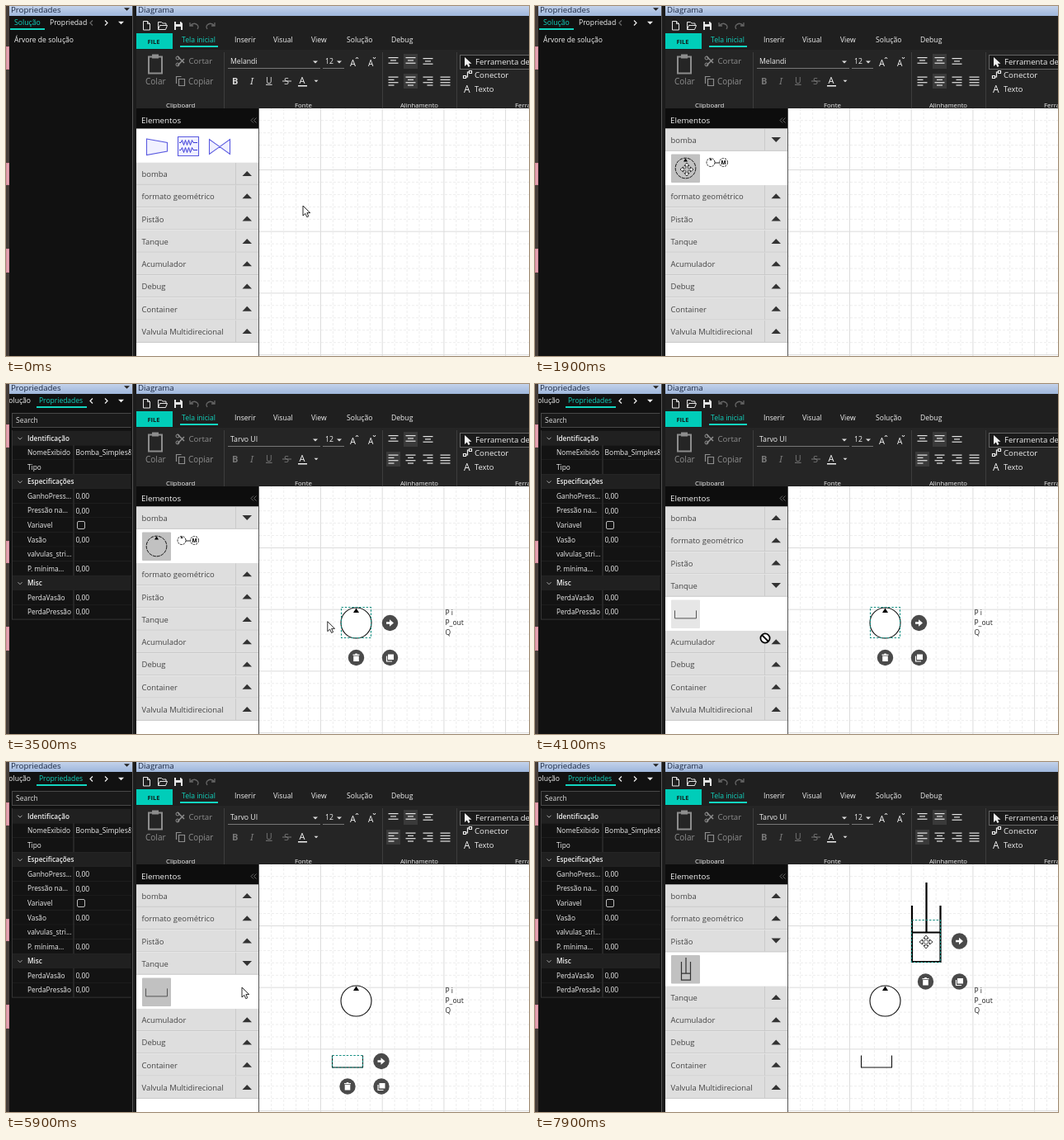
Write an HTML page that moves like this. It is 634 by 424 pixels and loops after 8 s.

```html
<!DOCTYPE html>
<html lang="pt">
<head>
<meta charset="utf-8">
<title>Diagrama</title>
<style>
html, body { margin: 0; width: 100%; height: 100%; overflow: hidden; background: #111; }
svg { display: block; width: 634px; height: 424px; font-family: "Open Sans", "Noto Sans", sans-serif; }
text { white-space: pre; }
</style>
</head>
<body>
<svg id="stage" viewBox="0 0 634 424" xmlns="http://www.w3.org/2000/svg">
<defs>
<linearGradient id="title" x2="0" y2="1"><stop offset="0" stop-color="#c3d2ea"/><stop offset="1" stop-color="#9fb7dc"/></linearGradient>
<clipPath id="side"><rect x="4" y="12" width="147.500" height="412"/></clipPath>
<clipPath id="tabA"><rect x="4" y="12" width="94.500" height="20"/></clipPath>
<clipPath id="ribbon"><rect x="158" y="12" width="476" height="112"/></clipPath>
</defs>
<g id="base"></g><g id="live"></g>
</svg>
<script>
const LOOP = 8000, TEAL = '#12d5c0', ROW = 27.3, OPEN = 41;
const $ = id => document.getElementById(id);

const rect = (x, y, w, h, fill, extra = '') =>
  `<rect x="${x}" y="${y}" width="${w}" height="${h}" fill="${fill}" ${extra}/>`;
const path = (d, stroke, w = 1, fill = 'none', extra = '') =>
  `<path d="${d}" stroke="${stroke}" stroke-width="${w}" fill="${fill}" ${extra}/>`;
const circle = (x, y, r, fill, extra = '') =>
  `<circle cx="${x}" cy="${y}" r="${r}" fill="${fill}" ${extra}/>`;
// y is the middle of the line
const text = (x, y, s, size, fill, extra = '') =>
  `<text x="${x}" y="${y + size * 0.36}" font-size="${size}" fill="${fill}" ${extra}>${s}</text>`;
const at = (x, y, s) => `<g transform="translate(${x} ${y})">${s}</g>`;
const down = (x, y, r, fill) => path(`M${x - r} ${y - r / 2}h${2 * r}l${-r} ${r}z`, 'none', 0, fill);

function grid() {
  let minor = '', major = '';
  for (let i = -4; i < 18; i++) {
    const x = 381.500 + i * 14.940, y = 198.500 + i * 14.940;
    const v = x > 307 && x < 634 ? `M${x.toFixed(1)} 124V424` : '';
    const h = y > 124 && y < 424 ? `M307 ${y.toFixed(1)}H634` : '';
    if (i % 5) minor += v + h; else major += v + h;
  }
  return rect(307, 124, 327, 300, '#fff') +
    path(minor, '#ededed', 1, 'none', 'stroke-dasharray="3 2"') + path(major, '#dcdcdc');
}

function frame() {
  let s = rect(0, 0, 634, 424, '#111') + rect(0, 0, 4, 424, '#453d39');
  for (const [y, h] of [[49, 28], [190, 27], [294, 29]])
    s += rect(0, y, 4, h, '#d58a9c') + rect(1.500, y + 1, 1, h - 2, '#f0c0ca');
  s += rect(153, 0, 5, 424, '#1c1c1c') + rect(153, 0, 1, 424, '#555');
  s += rect(4, 0, 149, 12, 'url(#title)') + rect(158, 0, 476, 12, 'url(#title)');
  s += text(6, 4, 'Propriedades', 9.700, '#1d2a44') + text(160, 4, 'Diagrama', 9.700, '#1d2a44');
  s += down(146.500, 4, 3.500, '#222');
  return s;
}

function quickBar() {
  const c = '#e6e6e6';
  return path('M166.500 18.500h5l3 3v7.500h-8zM171.500 18.500v3h3', c) +
    path('M184.500 28.500v-9h4l1.500 1.500h4v2M184.500 28.500l2-5h9l-2 5z', c) +
    path('M204 19h8l2 2v8h-10z', 'none', 0, c) + rect(206, 19, 5, 3, '#222') + rect(206, 25, 6, 4, '#222') +
    path('M223 20v4h4M223 24q5 -5 9 -1q2 2 0 5', '#666', 1.300) +
    path('M253 20v4h-4M253 24q-5 -5 -9 -1q-2 2 0 5', '#666', 1.300);
}

function lines(x, y, kind, on) {
  let s = on ? rect(x - 8.500, y - 9, 17, 18, '#3a3a3a') : '';
  const [mode, n] = kind;
  for (let i = 0; i < n; i++) {
    const w = i % 2 && mode !== 'j' ? 7 : 12;
    const dx = mode === 'l' ? -6 : mode === 'r' ? 6 - w : -w / 2;
    s += rect(x + dx, y - (n === 4 ? 5.500 : 5) + i * 3.300, w, 1.200, '#e2e2e2');
  }
  return s;
}

function ribbon() {
  const g = '#8d8d8d', w = '#f0f0f0';
  let s = rect(158, 12, 476, 41, '#1f1f1f') + rect(158, 53, 476, 71, '#252525') + quickBar();
  s += rect(158, 33, 44, 19, '#00cdb9') + text(179, 43, 'FILE', 7.500, '#10201e', 'font-weight="700" text-anchor="middle"');
  s += text(213, 41, 'Tela inicial', 8.600, TEAL) + rect(211, 48, 46, 2, TEAL);
  for (const [x, n] of [[277, 'Inserir'], [324, 'Visual'], [370, 'View'], [413, 'Solução'], [467, 'Debug']])
    s += text(x, 41, n, 8.600, w);
  for (const x of [264, 456, 546]) s += rect(x, 56, 1, 68, '#3d3d3d');
  // clipboard
  s += rect(173, 61.500, 16, 20, 'none', `stroke="${g}" stroke-width="2"`) + rect(177, 58.500, 8, 5, g);
  s += text(169, 91, 'Colar', 10, g) + text(221.500, 67, 'Cortar', 9.700, g) + text(221, 91, 'Copiar', 9.900, g);
  s += path('M208 61l8 8M208 72l8 -8', g, 1.500) + circle(208, 63, 2, 'none', `stroke="${g}"`) + circle(208, 71, 2, 'none', `stroke="${g}"`);
  s += path('M206.500 94v-8.500h6M209.500 88.500h7v8h-7z', g, 1.200);
  s += text(194, 120, 'Clipboard', 7.800, w) + text(350, 120, 'Fonte', 7.900, w) +
    text(478, 120, 'Alinhamento', 7.700, w) + text(617, 120, 'Ferramentas', 7.900, w);
  // font
  s += rect(269, 75, 112, 1, '#777') + rect(384, 75, 26, 1, '#777');
  s += down(375, 68, 3, '#ddd') + down(404, 68, 3, '#ddd') + text(387, 67, '12', 8.700, w);
  s += text(417, 69, 'A', 11, w) + path('M424 64l1.500 -2l1.500 2', w) + text(439, 69, 'A', 10, w) + path('M445 62l1.500 2l1.500 -2', w);
  s += text(355.500, 90, 'A', 11, w) + rect(354, 96, 11, 1.500, w) + down(376, 91, 2.500, '#ddd');
  // tools
  s += rect(550.500, 59.500, 90, 17, '#1a1a1a', 'stroke="#666"');
  s += path('M556 62v11l2.800 -2.500l1.700 3.500l2 -1l-1.700 -3.300h3.700z', 'none', 0, w);
  s += text(569, 68, 'Ferramenta de', 9.600, w) + text(568, 83.500, 'Conector', 9.700, w) + text(568, 101, 'Texto', 9.400, w);
  s += path('M554.500 84.500h3v3h-3zM561.500 78.500h3v3h-3zM557.500 86h2v-6h2', w, 1.200);
  s += text(555, 101, 'A', 12, w);
  return `<g clip-path="url(#ribbon)">${s}</g>`;
}

$('base').innerHTML = frame() + grid() + ribbon() +
  rect(158, 124, 148, 24.500, '#0d0d0d') + rect(158, 148.500, 148, 275.500, '#fff') + rect(306, 124, 1, 300, '#555') +
  text(164, 138, 'Elementos', 9.800, '#f4f4f4') + path('M300 135.500l-3 3l3 3M303.500 135.500l-3 3l3 3', '#666');

function sidePanel(sel) {
  const w = '#f0f0f0';
  let s = '', tabs;
  if (!sel) {
    tabs = text(10, 19.500, 'Solução', 8.700, TEAL) + text(53, 19.500, 'Propriedades', 8.700, w);
    s += rect(5, 27, 42, 2, TEAL) + text(10, 41, 'Árvore de solução', 8.600, w);
  } else {
    tabs = text(30, 19.500, 'Solução', 8.600, w, 'text-anchor="end"') + text(40, 19.500, 'Propriedades', 8.500, TEAL);
    s += rect(37, 27, 61, 2, TEAL) + rect(7.500, 35.500, 150, 17, '#1a1a1a', 'stroke="#484848"') + text(12, 44, 'Search', 8.500, '#ddd');
    const rows = [['Identificação'], ['NomeExibido', 'Bomba_Simples&amp;1'], ['Tipo', ''], ['Especificações'],
      ['GanhoPress...', '0,00'], ['Pressão na...', '0,00'], ['Variavel', 'box'], ['Vasão', '0,00'],
      ['valvulas_stri...', ''], ['P. mínima...', '0,00'], ['Misc'], ['PerdaVasão', '0,00'], ['PerdaPressão', '0,00']];
    rows.forEach(([name, val], i) => {
      const y = 65.700 + i * 17.550, head = val === undefined;
      s += rect(7, y - 9, 145, 17.500, head ? '#202020' : '#131313') + rect(7, y + 8.300, 145, 1, '#343434');
      if (head) s += path(`M14.500 ${y - 1}l2.500 2.500l2.500 -2.500`, '#aaa') + text(26, y, name, 8.200, w, 'font-weight="600"');
      else {
        s += rect(81.500, y - 9, 1, 17.500, '#3c3c3c') + text(26, y, name, 8.300, w);
        s += val === 'box' ? rect(86.500, y - 4.500, 9, 9, 'none', 'rx="1.500" stroke="#bbb"') : text(84.500, y, val, 8.500, w);
      }
    });
    s += rect(7, 56, 1, 229, '#343434');
  }
  s += path('M105 17.500l-3 3l3 3', sel ? w : '#666', 1.200) + path('M120 17.500l3 3l-3 3', w, 1.200) + down(139.500, 20.500, 3.500, w);
  return `<g clip-path="url(#side)"><g clip-path="url(#tabA)">${tabs}</g>${s}</g>`;
}

function fontGroup(t, sel) {
  const c = t < 400 ? '#d8d8d8' : '#777';
  return text(272, 67, sel ? 'Tarvo UI' : 'Melandi', 8.700, '#f0f0f0') +
    text(274, 91, 'B', 11, c, 'font-weight="700"') + text(296, 91, 'I', 11, c, 'font-style="italic" font-family="Noto Serif, serif"') +
    text(315, 90, 'U', 10.500, c, 'text-decoration="underline"') + text(337, 91, 'S', 11, c) + rect(335, 90.500, 11, 1, c) +
    lines(469.500, 67, ['c', 3]) + lines(490.500, 67, ['c', 3], true) + lines(511.500, 68, ['c', 3]) +
    lines(469.500, 91, ['l', 4], sel) + lines(490.500, 91, ['c', 4], !sel) + lines(511.500, 91, ['r', 4]) + lines(532.500, 91, ['j', 4]);
}

const NAMES = ['bomba', 'formato geométrico', 'Pistão', 'Tanque', 'Acumulador', 'Debug', 'Container', 'Valvula Multidirecional'];
const OPENS = [[0, -1], [900, 0], [3700, 3], [6300, 2]];
// hover and selection times of each item
const ITEMS = { 0: [1400, 1900], 3: [3800, 4400], 2: [7000, 7700] };

function symbols() {
  const zig = y => `M210 ${y}h2` + 'l1.500 -3l2 6l2 -6l2 6l2 -6l2 6l2 -6l1.500 3'.repeat(1) + 'h5';
  return path('M170.500 161l25 4.500v10.500l-25 4.500zM208.500 158.500h25v23h-25zM246.500 161.500v18l25 -18v18z', '#5a5ae0', 1.100, '#f1f1ff') +
    path(zig(165.500) + zig(174.500), '#3a3ad8');
}

function item(k, y, t) {
  const [hover, pick] = ITEMS[k];
  let s = t >= hover ? rect(165, y - 17, 35, 34.500, t >= pick ? '#c1c1c1' : '#e6e6e6', 'rx="1"') : '';
  if (k === 0) s += circle(182.500, y, 12.300, 'none', 'stroke="#111" stroke-dasharray="4 1"') +
    path(`M182.500 ${y - 12}l2.500 4h-5z`, 'none', 0, '#000') +
    circle(213, y - 7, 5, 'none', 'stroke="#222" stroke-dasharray="2.500 1"') + path(`M213 ${y - 12}l1.500 2.500h-3z`, 'none', 0, '#000') +
    path(`M218 ${y - 6.500}h5`, '#222') + circle(228.500, y - 7, 5, 'none', 'stroke="#222" stroke-dasharray="2.500 1"') +
    text(228.500, y - 7, 'M', 6.500, '#000', 'text-anchor="middle" font-weight="700"');
  if (k === 3) s += path(`M169.500 ${y - 4}v9.500h26v-9.500`, '#555');
  if (k === 2) s += path(`M177.500 ${y - 9}v22h11v-22M177.500 ${y + 5}h11M183 ${y - 14}v19`, '#333', 1.200);
  return s;
}

function palette(t) {
  const [since, open] = OPENS.filter(o => t >= o[0]).pop();
  let y = 162, s = '';
  if (open < 0) { s += symbols(); y += OPEN; }
  NAMES.forEach((n, i) => {
    const tri = i !== open ? 'M286.500 3h11.500l-5.800 -6z' :
      t - since < 200 ? 'M288 -3.500l11 1l-8.500 7.500z' : 'M286.500 -3h11.500l-5.800 6z';
    s += at(0, y, rect(158, -13.300, 148, 26.800, '#dedede') + rect(158, 12.800, 148, 1, '#c9c9c9') + rect(278, -13, 1, 26, '#cacaca') +
      text(164.500, 0.500, n, 9.450, '#444') + path(tri, 'none', 0, '#333'));
    if (i === open) { s += item(i, +(y + 34.500).toFixed(1), t); y += OPEN; }
    y += ROW;
  });
  return s;
}

function handles(x1, y1, x2, y2, x3) {
  const disc = (x, y, icon) => at(x, y, circle(0, 0, 9.700, '#4a4a4a') + icon);
  return disc(x2, y1, path('M-4.500 -1.200h4v-3l5 4.200l-5 4.200v-3h-4z', 'none', 0, '#fff')) +
    disc(x1, y2, path('M-3.300 -2h6.600v6.500h-6.600zM-4 -4h2.500l.5 -1h2l.5 1h2.500v1.200h-8z', 'none', 0, '#fff')) +
    disc(x2, y2, rect(-2.500, -4, 7, 6.500, '#fff') + path('M-4 -2v6.500h6.500', '#fff', 1.200));
}

const DASH = 'stroke-dasharray="2.500 1.800"', GREEN = '#128f82';

function canvas(t) {
  let s = '';
  if (t >= 3300) {
    s += circle(424.500, 289.500, 18.500, '#fff', 'stroke="#111" stroke-width="1.100"') + path('M424.500 271.500l3.500 5.500h-7z', 'none', 0, '#000');
    ['P i', 'P_out', 'Q'].forEach((l, i) => s += text(532.500, 277 + i * 11.800, l, 8.500, '#222'));
    if (t < 4300) s += path('M406.500 270.500h36v37h-36z', GREEN, 1.100, 'none', DASH) + handles(424.500, 289.500, 465.500, 331.500);
  }
  if (t >= 4400) {
    s += path('M395.500 355.500v14.500h37v-14.500', '#111', 1.100);
    if (t < 7700) s += path('M395.500 355.500h37v14.500h-37z', GREEN, 1.100, 'none', DASH) + handles(414, 362.500, 455, 393);
  }
  if (t >= 7700) {
    s += path('M457 174v68h34.500v-68M457 206.500h34.500M474.500 146v60', '#000', 2.200) +
      path('M456.500 191.500h35v51h-35z', GREEN, 1.100, 'none', DASH) + handles(473.500, 217, 514.500, 266);
  }
  return s;
}

const KEYS = [
  [0, 360, 242, 'arrow'], [100, 360, 242, 'arrow'], [800, 292, 203, 'arrow'], [900, 292, 203, 'arrow'],
  [1000, 277, 206, 'arrow'], [1500, 186, 197, 'move'], [1900, 184, 198, 'move'], [2600, 186, 200, 'ban'],
  [3000, 314, 289, 'arrow'], [3200, 424, 289, 'arrow'], [3300, 424, 289, 'move'], [3400, 424, 289, 'arrow'],
  [3700, 292, 284, 'arrow'], [3900, 186, 280, 'ban'], [4100, 279, 308, 'ban'], [4200, 350, 340, 'arrow'],
  [4300, 414, 362, 'arrow'], [4400, 414, 362, 'move'], [4900, 414, 362, 'arrow'], [5700, 281, 301, 'arrow'],
  [5900, 286, 273, 'arrow'], [6200, 292, 216, 'arrow'], [6700, 292, 217, 'arrow'], [7000, 200, 245, 'move'],
  [7100, 190, 247, 'move'], [7300, 188, 250, 'ban'], [7500, 320, 235, 'arrow'], [7700, 474, 218, 'move'], [8000, 474, 218, 'move']];

const CURSORS = {
  arrow: path('M0 0v12l2.800 -2.600l2 4.300l2 -1l-1.900 -4.100h3.800z', '#111', 0.900, '#fff'),
  ban: circle(0, 0, 5.600, '#fff', 'stroke="#000" stroke-width="1.800"') + path('M-4 -4l8 8', '#000', 1.800),
  move: [0, 90, 180, 270].map(a =>
    path('M-1 -1.500v-3h-2l3 -3.500l3 3.500h-2v3', '#222', 0.900, '#fff', `transform="rotate(${a})"`)).join('')
};

function pointer(t) {
  const i = KEYS.findIndex(k => k[0] > t), a = KEYS[i - 1], b = KEYS[i];
  const p = (t - a[0]) / (b[0] - a[0]), e = p * p * (3 - 2 * p);
  return at((a[1] + (b[1] - a[1]) * e).toFixed(1), (a[2] + (b[2] - a[2]) * e).toFixed(1), CURSORS[a[3]]);
}

function draw(t) {
  const sel = t >= 3300;
  $('live').innerHTML = sidePanel(sel) + fontGroup(t, sel) + palette(t) + canvas(t) + pointer(t);
}

let start = null, shown = -1;
function tick(now) {
  if (start === null) start = now;
  const t = Math.floor(((now - start) % LOOP) / 100) * 100;
  if (t !== shown) draw(shown = t);
  requestAnimationFrame(tick);
}
draw(0);
requestAnimationFrame(tick);
</script>
</body>
</html>
```
